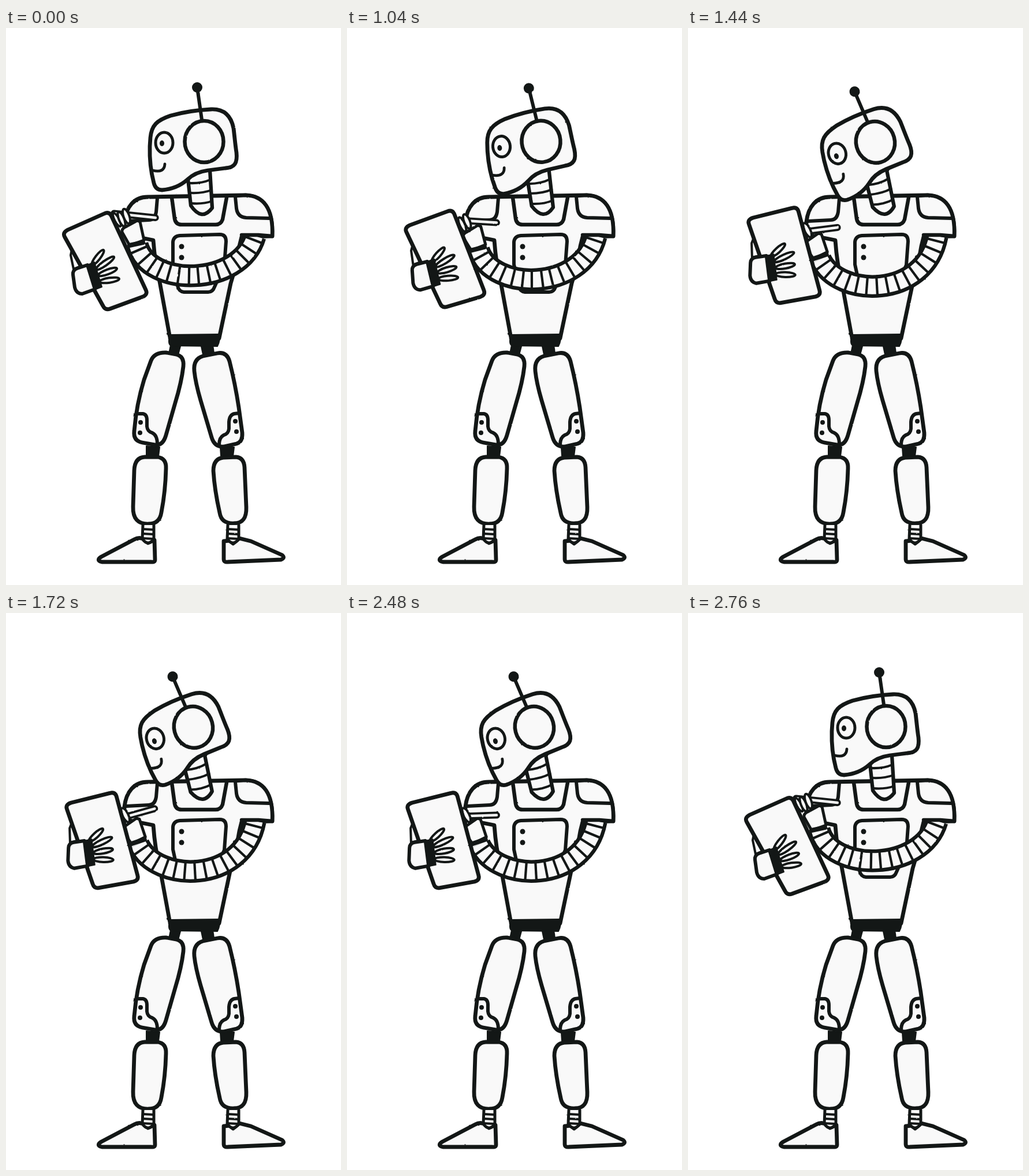
Animation of 580 by 966 pixels, one loop 3840 ms. Source, as an HTML page with a canvas:

```html
<!DOCTYPE html>
<html lang="en">
<head>
<meta charset="utf-8">
<title>Robot taking notes</title>
<style>
html, body { margin: 0; width: 100%; height: 100%; overflow: hidden; background: #fff; }
canvas { display: block; width: 580px; height: 966px; filter: url(#rough); }
svg { position: absolute; }
</style>
</head>
<body>
<svg width="0" height="0">
  <filter id="rough" x="0" y="0" width="100%" height="100%" color-interpolation-filters="sRGB">
    <feTurbulence type="fractalNoise" baseFrequency="0.12" numOctaves="2" seed="4"/>
    <feDisplacementMap in="SourceGraphic" scale="1.6" xChannelSelector="R" yChannelSelector="G"/>
  </filter>
</svg>
<canvas width="580" height="966"></canvas>
<script>
const ctx = document.querySelector('canvas').getContext('2d');
const INK = '#131716', BODY = '#f9f9f9';
const LOOP = 3840, STEP = 40, MOVE = 240;
const DOWN = 940, UP = 2514, WAGS = 4;
const RAD = Math.PI / 180;

const lerp = (a, b, k) => a + (b - a) * k;
const ease = x => { x = Math.min(1, Math.max(0, x)); return x * x * (3 - 2 * x); };

function shape(d, { fill = BODY, line = INK, w = 6.8 } = {}) {
  const path = new Path2D(d);
  if (fill) { ctx.fillStyle = fill; ctx.fill(path); }
  if (line) { ctx.strokeStyle = line; ctx.lineWidth = w; ctx.stroke(path); }
}
const stroke = (d, w = 6.5, line = INK) => shape(d, { fill: null, line, w });
const solid = d => shape(d, { fill: INK, w: 2 });

function oval(x, y, rx, ry, w = 6.5, fill = BODY, turn = 0) {
  ctx.beginPath();
  ctx.ellipse(x, y, rx, ry, turn, 0, Math.PI * 2);
  ctx.fillStyle = fill;
  ctx.fill();
  if (w) { ctx.strokeStyle = INK; ctx.lineWidth = w; ctx.stroke(); }
}
const dot = (x, y, r = 4) => oval(x, y, r, r, 0, INK);

function finger(x1, y1, x2, y2, r) {
  const dx = x2 - x1, dy = y2 - y1;
  oval((x1 + x2) / 2, (y1 + y2) / 2, Math.hypot(dx, dy) / 2, r, 4, BODY, Math.atan2(dy, dx));
}

// Rotates about (x, y), then shifts, while drawing a part.
function posed(x, y, deg, dx, dy, draw) {
  ctx.save();
  ctx.translate(x + dx, y + dy);
  ctx.rotate(deg * RAD);
  ctx.translate(-x, -y);
  draw();
  ctx.restore();
}

function legs() {
  solid('M285 550L302 552L298 567L282 565Z');
  solid('M338 552L358 550L361 569L342 571Z');
  solid('M243 725L266 727L264 743L243 741Z');
  solid('M371 727L395 727L393 743L372 742Z');

  shape('M278 563L294 566Q309 569 307 587Q304 614 293 650L277 706Q272 724 259 723L236 719Q220 716 222 699Q226 652 239 610L251 577Q257 562 278 563Z');
  shape('M341 569L366 564Q382 561 387 578Q397 618 403 658L409 702Q410 718 399 721L377 726Q361 727 356 710L337 646Q328 615 326 595Q324 574 341 569Z');
  stroke('M230 669L237 669Q244 670 244 680L244 691Q245 700 253 702Q262 706 262 722', 6);
  stroke('M403 668L395 669Q387 671 386 683L386 695Q385 704 377 706Q369 710 369 723', 6);
  dot(233, 684); dot(232, 702); dot(397, 682); dot(399, 700);

  shape('M240 744L262 744Q278 746 277 764Q276 804 269 840Q266 860 247 860Q219 861 220 830L222 767Q223 745 240 744Z');
  shape('M376 745L398 744Q412 745 413 762L416 831Q417 859 395 859Q373 860 370 841Q361 801 359 768Q359 747 376 745Z');

  shape('M165 917L222 887Q231 882 240 887L246 893L257 888L258 922Q258 927 252 926L166 926Q155 923 165 917Z');
  shape('M377 890L387 889L393 894L404 885L424 890L478 914Q484 919 476 922L384 926Q377 927 377 921Z');
  for (const x of [246, 393]) {
    shape(`M${x - 9} 862L${x - 10} 886Q${x} 900 ${x + 10} 886L${x + 10} 862`, { w: 5 });
    for (const y of [869, 877, 885]) stroke(`M${x - 9} ${y}L${x + 9} ${y + 1}`, 4);
  }
}

function torso() {
  shape('M245 293L415 290C445 291 463 312 461 361L408 362L404 378Q398 415 389 443L369 538L284 538L266 440Q258 410 255 368L205 358L205 336C208 310 222 293 245 293Z');
  solid('M284 532L369 531Q372 540 366 552L286 551Q279 548 284 532Z');
  stroke('M262 295L260 319Q258 333 247 333L208 335', 6);
  stroke('M287 294L292 331Q294 341 304 341L363 341Q372 341 375 332L382 294');
  shape('M301 360L370 358Q381 358 381 370L378 411L361 449Q358 458 350 458L308 458Q299 457 297 447L289 410L289 371Q290 361 301 360Z', { w: 6 });
  dot(304, 379, 4.5); dot(304, 398, 4.5);
}

function rightShoulder() {
  const edge = 'M398 291L415 290C445 291 463 312 461 361L437 359L408 359';
  shape(edge, { line: null });
  stroke(edge);
  stroke('M397 293L399 313Q401 328 416 329L456 330', 6);
}

function sleeve(p) {
  const end = [lerp(227, 229, p), lerp(376, 401, p)];
  const c1 = [lerp(405, 410, p), lerp(450, 471, p)];
  const c2 = [lerp(245, 260, p), lerp(450, 468, p)];
  const start = [431, 361];
  const at = u => [0, 1].map(i => {
    const v = 1 - u;
    return v * v * v * start[i] + 3 * v * v * u * c1[i] + 3 * v * u * u * c2[i] + u * u * u * end[i];
  });
  const d = `M${start}C${c1} ${c2} ${end}`;
  ctx.lineCap = 'butt';
  stroke(d, 39.5);
  stroke(d, 27, BODY);

  const pts = Array.from({ length: 121 }, (_, i) => at(i / 120));
  const dist = [0];
  for (let i = 1; i < pts.length; i++)
    dist.push(dist[i - 1] + Math.hypot(pts[i][0] - pts[i - 1][0], pts[i][1] - pts[i - 1][1]));
  const total = dist[120], ribs = 15;
  for (let n = 0, i = 1; n < ribs; n++) {
    while (dist[i] < total * (n + 0.35) / ribs && i < 119) i++;
    const [x, y] = pts[i];
    const dir = Math.atan2(pts[i + 1][1] - pts[i - 1][1], pts[i + 1][0] - pts[i - 1][0]);
    const nx = -Math.sin(dir) * 16, ny = Math.cos(dir) * 16;
    stroke(`M${x - nx} ${y - ny}L${x + nx} ${y + ny}`, 4.2);
  }
  ctx.lineCap = 'round';
}

function writingHand(p, wag) {
  posed(225, 374, -6 * p, 3 * p, 22 * p, () => {
    shape('M201 354Q200 348 207 345L227 334L232 336L239 368L214 377Z', { w: 5 });
    stroke('M214 377L237 372', 8);
  });
  posed(212, 324, lerp(6, 0, p) - wag, 0, 28 * p, () => {
    const d = `M${lerp(187, 208, p)} 324L259 324`;
    stroke(d, 12);
    stroke(d, 4.5, BODY);
  });
  posed(225, 374, -6 * p, 3 * p, 22 * p, () => {
    finger(186, 321, 198, 344, 4);
    finger(195, 319, 205, 344, 4.5);
    finger(204, 314, 213, 339, 5);
  });
}

function board(p) {
  posed(172, 404, 10 * p, -4.5 * p, -10.5 * p, () => {
    shape('M114 384L112 394L117 418L129 413Z', { w: 4 });
    shape('M107 350L170 322Q178 318 182 325L242 454Q246 462 237 466L180 487Q172 490 168 482L102 363Q97 355 107 350Z');
    finger(149, 411, 169, 385, 4.2);
    finger(156, 419, 187, 397, 4.2);
    finger(160, 429, 192, 417, 4.2);
    finger(162, 440, 196, 435, 4.2);
    shape('M123 417L141 411L154 453L132 461Q122 461 119 450L116 428Q115 420 123 417Z', { w: 6 });
    solid('M141 411L153 406L166 449L153 454Z');
  });
}

function neck(p) {
  posed(338, 312, -8 * p, 0, 0, () => {
    shape('M314 252L320 308Q339 336 357 312L353 246', { w: 6.3 });
    stroke('M317 269Q338 270 354 263', 4);
    stroke('M319 286Q340 287 356 281', 4);
    stroke('M320 304Q341 306 357 300', 4);
  });
}

function head(p) {
  posed(337.5, 268, -15 * p, 0, 0, () => {
    shape('M250 190C252 169 261 160 285 152C310 145 335 142 355 141C379 140 390 154 394 174C396 191 397 203 399 216C401 234 396 242 380 243L349 247Q327 250 314 263Q296 279 270 281Q259 281 256 269Q248 239 249 205Z');
    stroke('M331 103L339 159', 6);
    dot(331, 103, 9);
    oval(343, 197, 33.5, 36);
    oval(274, 199, 15, 18, 5);
    oval(270 + 1.5 * p, 200 + 3 * p, 4, 5, 0, INK);
    stroke('M254 247Q274 252 275 236', 4.8);
  });
}

function draw(ms) {
  const t = Math.floor(ms % LOOP / STEP) * STEP;
  const p = ease((t - DOWN) / MOVE) - ease((t - UP) / MOVE);
  const from = DOWN + MOVE;
  const wag = t > from && t < UP
    ? 9 * (1 - Math.cos(2 * Math.PI * WAGS * (t - from) / (UP - from))) : 0;

  ctx.fillStyle = '#fff';
  ctx.fillRect(0, 0, 580, 966);
  ctx.lineJoin = ctx.lineCap = 'round';
  legs();
  torso();
  neck(p);
  head(p);
  sleeve(p);
  rightShoulder();
  writingHand(p, wag);
  board(p);
}

const t0 = performance.now();
function tick() {
  draw(performance.now() - t0);
  requestAnimationFrame(tick);
}
tick();
</script>
</body>
</html>
```
